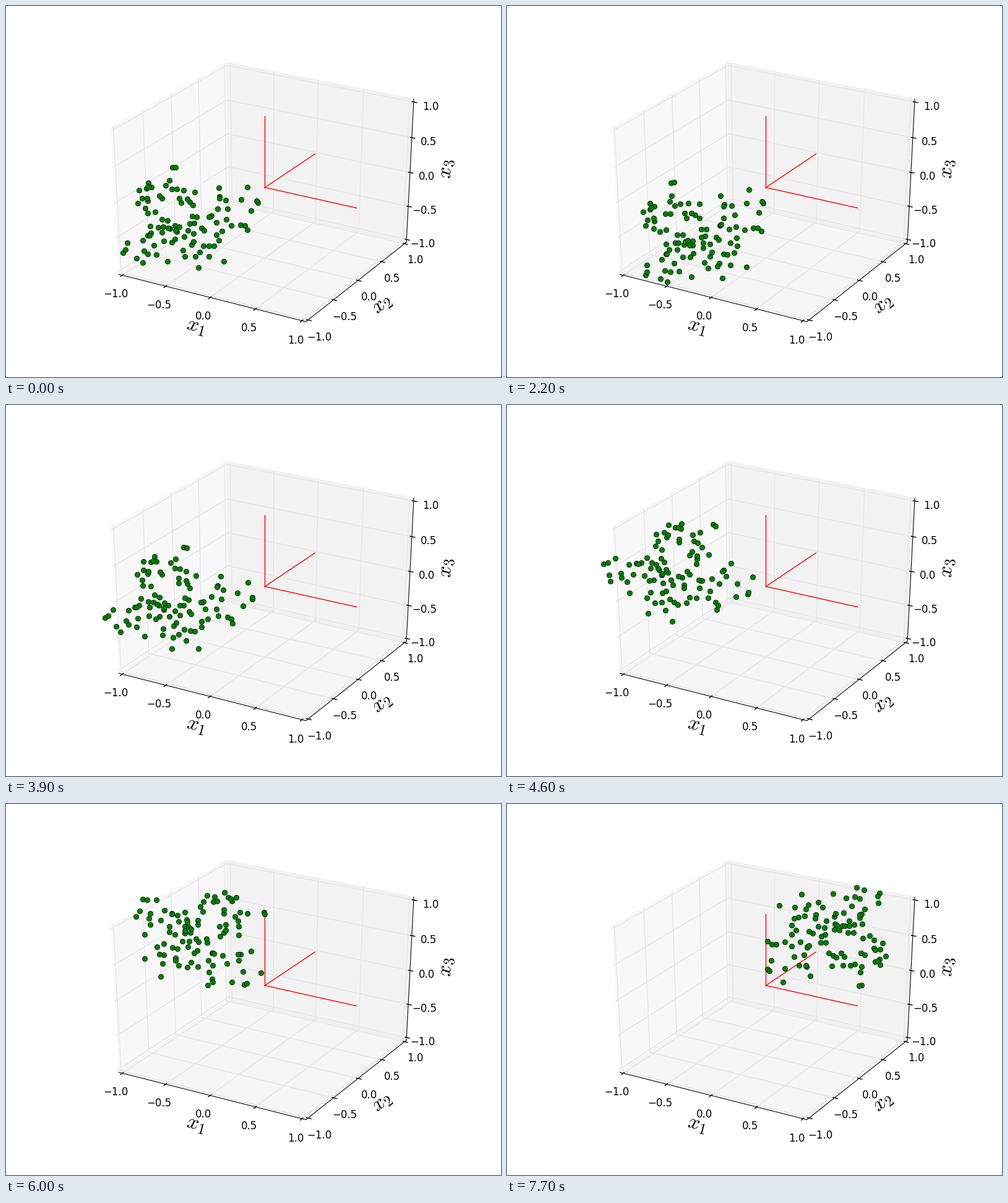
A matplotlib script for the animation above (9.8 s loop, 800x600 px).

```python
import numpy as np
import matplotlib.pyplot as plt
from matplotlib.animation import FuncAnimation

plt.rcParams.update({
    "font.family": "DejaVu Sans",
    "mathtext.fontset": "cm",
})

FRAMES, INTERVAL = 98, 100
EDGE = 1 + 1 / 24          # panes sit slightly outside the unit limits
TICKS = np.linspace(-1, 1, 5)
DELTA = 1 / 6


def camera_basis(elevation, azimuth):
    """Rows: right, up, towards the viewer."""
    el, az = np.radians([elevation, azimuth])
    toward = np.array([np.cos(az) * np.cos(el), np.sin(az) * np.cos(el), np.sin(el)])
    right = np.array([-np.sin(az), np.cos(az), 0])
    return np.array([right, np.cross(toward, right), toward])


CAMERA = camera_basis(30, -60)


def to_pixels(view):
    """Perspective from camera coordinates (3, n) to stage pixels."""
    x, y, z = view / 2
    depth = 10 - z
    return 418.38 + 3351.35 * x / depth, 293.51 - 2594.6 * y / depth


def project(*points):
    return to_pixels(CAMERA @ np.array(points, float).T)


fig = plt.figure(figsize=(8, 6), dpi=100, facecolor="white")
ax = fig.add_axes([0, 0, 1, 1])
ax.set_xlim(0, 800)
ax.set_ylim(600, 0)
ax.axis("off")


def line(a, b, color, width, zorder):
    ax.plot(*project(a, b), color=color, lw=width, zorder=zorder,
            solid_capstyle="projecting")


BACK = np.array([-EDGE, EDGE, -EDGE])     # corner where the three panes meet


def draw_pane(normal, shade):
    """Pane through the back corner; its outline stays open on one side."""
    u, v = [i for i in range(3) if i != normal]
    corners = []
    for su, sv in ((-1, -1), (1, -1), (1, 1), (-1, 1)):
        corner = BACK.copy()
        corner[u], corner[v] = su * EDGE, sv * EDGE
        corners.append(corner)
    color = (shade, shade, shade, 0.5)
    ax.add_patch(plt.Polygon(np.column_stack(project(*corners)), closed=False,
                             fc=color, ec=color, lw=1, zorder=1))


def draw_axis(index, edge, tick_dir):
    edge = np.array(edge, float) * EDGE
    outward = np.sign(edge)
    start, end = edge.copy(), edge.copy()
    start[index], end[index] = -EDGE, EDGE
    line(start, end, "black", 0.75, 3)

    step = np.zeros(3)
    step[tick_dir] = outward[tick_dir] * DELTA
    for value in TICKS:
        corner = BACK.copy()
        corner[index] = value
        for other in {0, 1, 2} - {index}:
            far = corner.copy()
            far[other] *= -1
            line(corner, far, "0.9", 1, 2)

        spot = edge.copy()
        spot[index] = value
        line(spot - 0.1 * step, spot + 0.2 * step, "black", 1, 3)

        x, y = project(spot + 0.73 * DELTA * outward)
        text = f"{value:.1f}".replace("-", "\u2212")
        ax.text(x[0], y[0] + 15, text, fontsize=12, ha="center",
                va="baseline", zorder=4)

    x, y = project(start, end)
    angle = np.degrees(np.arctan2(y[0] - y[1], x[1] - x[0]))
    x, y = project(edge + 1.6 * DELTA * outward)
    ax.text(x[0], y[0], f"$x_{index + 1}$", fontsize=24, rotation=angle,
            ha="center", va="center", zorder=4)


for normal, shade in enumerate((0.95, 0.90, 0.925)):
    draw_pane(normal, shade)

draw_axis(0, (0, -1, -1), 1)
draw_axis(1, (1, 0, -1), 0)
draw_axis(2, (1, 1, 0), 0)

for direction in np.eye(3):
    line((0, 0, 0), direction, "red", 1, 5)


def turn(a, b, degrees):
    c, s = np.cos(np.radians(degrees)), np.sin(np.radians(degrees))
    return c * a - s * b, s * a + c * b


def make_cloud(count):
    """Uniform unit cube seen along its diagonal: (along, across, depth)."""
    rng = np.random.default_rng(12)
    axes = np.array([[1, 1, 1], [1, -1, 0], [1, 1, -2]], float)
    axes /= np.linalg.norm(axes, axis=1, keepdims=True)
    return axes @ rng.random((count, 3)).T


CLOUD = make_cloud(100)

# The heading drifts between a few poses (step, degrees) ...
DRIFT = ((0, 210), (13, 230), (31, 213), (40, 193), (53, 139), (67, 136), (77, 46))
# ... and short bursts (step, extra heading) tip the cloud towards the viewer.
BURSTS = ((10, 25), (25, 22), (35, 30), (57, -10))
BURST_TILT, BURST_REACH = 48, 3.5


def smooth(k):
    k = min(max(k, 0), 1)
    return k * k * (3 - 2 * k)


def pose_at(step):
    heading, tilt = DRIFT[0][1], 0
    for (t0, a0), (t1, a1) in zip(DRIFT, DRIFT[1:]):
        heading += (a1 - a0) * smooth((step - t0) / (t1 - t0))
    for center, swing in BURSTS:
        pulse = smooth(1 - abs(step - center) / BURST_REACH)
        heading += swing * pulse
        tilt += BURST_TILT * pulse
    return heading, tilt


dots, = ax.plot([], [], "o", color="green", ms=6, mec="black", mew=0.5, zorder=6)


def update(frame):
    heading, tilt = pose_at(frame)
    along, side, depth = CLOUD
    along, depth = turn(along, depth, tilt)
    x, y = turn(along, side, heading)
    dots.set_data(*to_pixels(np.array([x, y, depth])))
    return dots,


anim = FuncAnimation(fig, update, frames=FRAMES, interval=INTERVAL,
                     repeat=True, repeat_delay=0)
plt.show()
```
